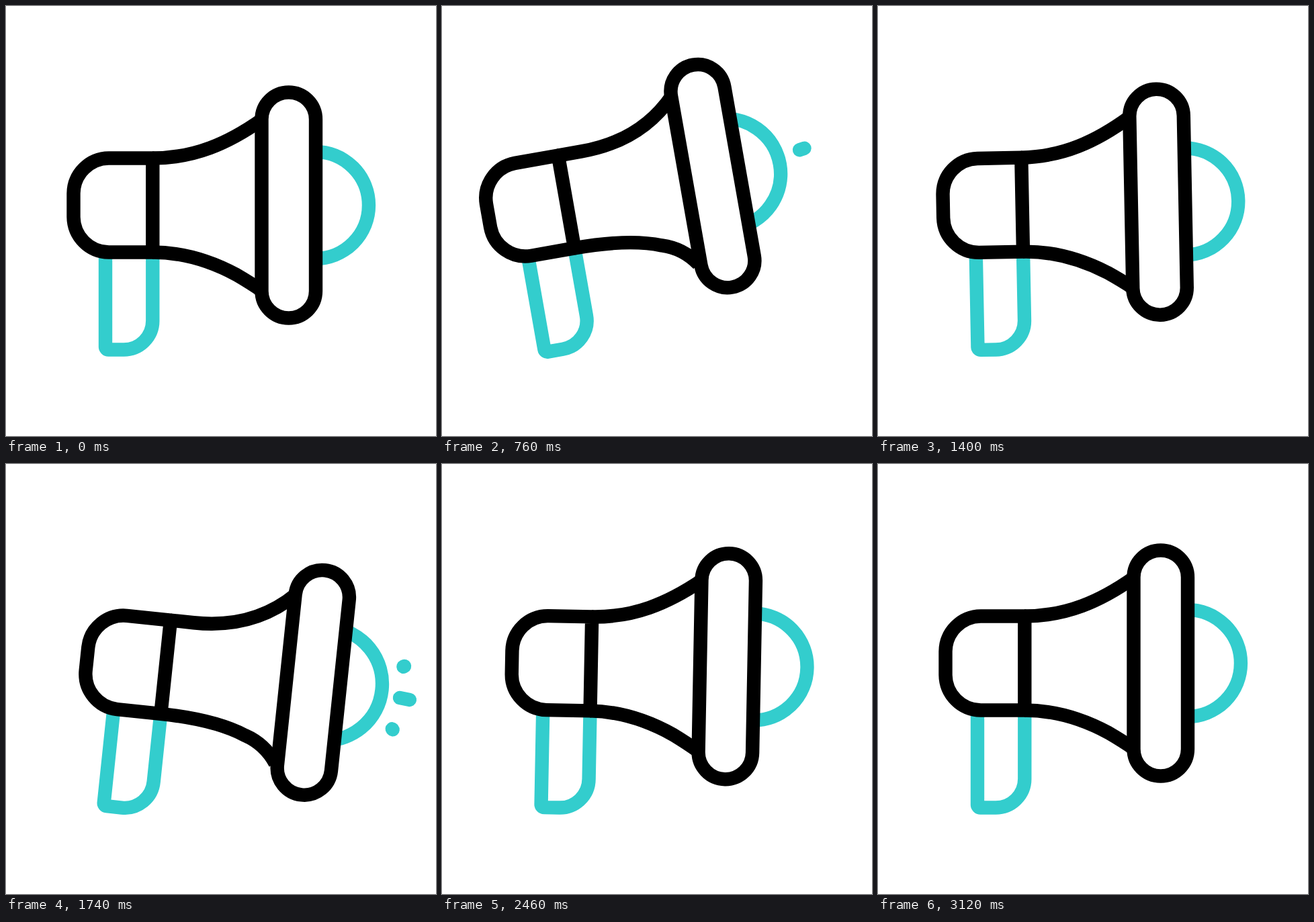
Animation, 640 px wide and 640 px high, one loop 3160 ms. Source, as an HTML page:

```html
<!DOCTYPE html>
<html lang="en">
<head>
<meta charset="utf-8">
<title>Megaphone</title>
<style>
  html, body { margin: 0; width: 100%; height: 100%; overflow: hidden; background: #fff; }
  svg { display: block; width: 100%; height: 100%; }
  .teal { stroke: #33cdcd; }
</style>
</head>
<body>
<svg viewBox="0 0 640 640" fill="none" stroke="#000" stroke-width="20.4" stroke-linejoin="round">
  <g id="megaphone">
    <path class="teal" d="M148 367V507A4.5 4.5 0 0 0 152.5 511.5H175A43 43 0 0 0 218.3 468V367"/>
    <path id="wave" class="teal"/>
    <path d="M218.3 226.5H153A53 53 0 0 0 100.5 279V314A53 53 0 0 0 153 366.5H218.3Z"/>
    <path id="horn"/>
    <rect id="plate" x="380.5" y="128.5" width="80.5" height="336" rx="40.25" fill="#fff"/>
  </g>
  <g id="rays" class="teal" stroke-linecap="round"><path/><path/><path/></g>
</svg>
<script>
const LOOP = 3160, START = 230, CYCLE = 960, TURN = 380;
const ANGLES = [0, -10, 6, 0];
const RAY_OFFSETS = [6, 1, -2];
const PIVOT = { x: 173, y: 484 }, WAVE = { x: 460.5, y: 296.5 };
const RAYS = [
  { x: 105, y: -46.5, angle: -37, length: 30, start: 545 },
  { x: 108, y: 0, angle: 0, length: 36, start: 510 },
  { x: 106, y: 47.5, angle: 40, length: 22, start: 545 }
];

const $ = id => document.getElementById(id);
const set = (el, name, value) => el.setAttribute(name, value);
const progress = (t, start, duration) => Math.min(1, Math.max(0, (t - start) / duration));
const ease = p => (1 - Math.cos(Math.PI * p)) / 2;
const mix = (a, b, p) => a + (b - a) * p;

function drawBell(push) {
  const m = (a, b) => mix(a, b, push);
  set($("plate"), "transform", `translate(${19 * push} 0)`);
  set($("horn"), "d",
    `M218 226.5H${m(218, 254)}C${m(280, 305)} 226.5 ${m(330, 358)} ${m(205, 212)} ${m(381, 400)} ${m(169, 169)}` +
    `M218 366.5C264 366.5 ${m(304, 312)} ${m(379, 371)} ${m(343, 347)} ${m(400, 385)}` +
    `C${m(355, 366)} ${m(407, 391)} ${m(368, 384)} ${m(415, 404)} ${m(381, 396)} ${m(424, 422)}`);
}

function drawWave(swell) {
  const r = 79.5 + 12 * swell, x = WAVE.x - 7 * swell;
  set($("wave"), "d", `M${x} ${WAVE.y - r}A${r} ${r} 0 0 1 ${x} ${WAVE.y + r}`);
}

// Each ray shoots outward, its tail following its head.
function drawRays(t, angle, offset) {
  const a = angle * Math.PI / 180, dx = WAVE.x - PIVOT.x, dy = WAVE.y - PIVOT.y;
  const x = PIVOT.x + dx * Math.cos(a) - dy * Math.sin(a);
  const y = PIVOT.y + dx * Math.sin(a) + dy * Math.cos(a);
  set($("rays"), "transform", `translate(${x} ${y}) rotate(${angle * 1.8}) translate(${offset} 0)`);
  RAYS.forEach((ray, i) => {
    const el = $("rays").children[i];
    const head = progress(t, ray.start, 95), tail = progress(t, ray.start + 40, 95);
    set(el, "transform", `translate(${ray.x} ${ray.y}) rotate(${ray.angle})`);
    set(el, "d", head > tail ? `M${ray.length * tail} 0H${ray.length * head}` : "");
  });
}

function draw() {
  const time = performance.now() % LOOP - START;
  const shout = Math.min(2, Math.max(0, Math.floor(time / CYCLE)));
  const t = time - shout * CYCLE;
  const angle = mix(ANGLES[shout], ANGLES[shout + 1], progress(t, 0, TURN));
  set($("megaphone"), "transform", `rotate(${angle} ${PIVOT.x} ${PIVOT.y})`);
  drawBell(ease(progress(t, TURN, 120)) - ease(progress(t, 500, 450)));
  drawWave(1.35 * Math.sin(Math.PI * progress(t, 510, 440)));
  drawRays(t, angle, RAY_OFFSETS[shout]);
  requestAnimationFrame(draw);
}
draw();
</script>
</body>
</html>
```
